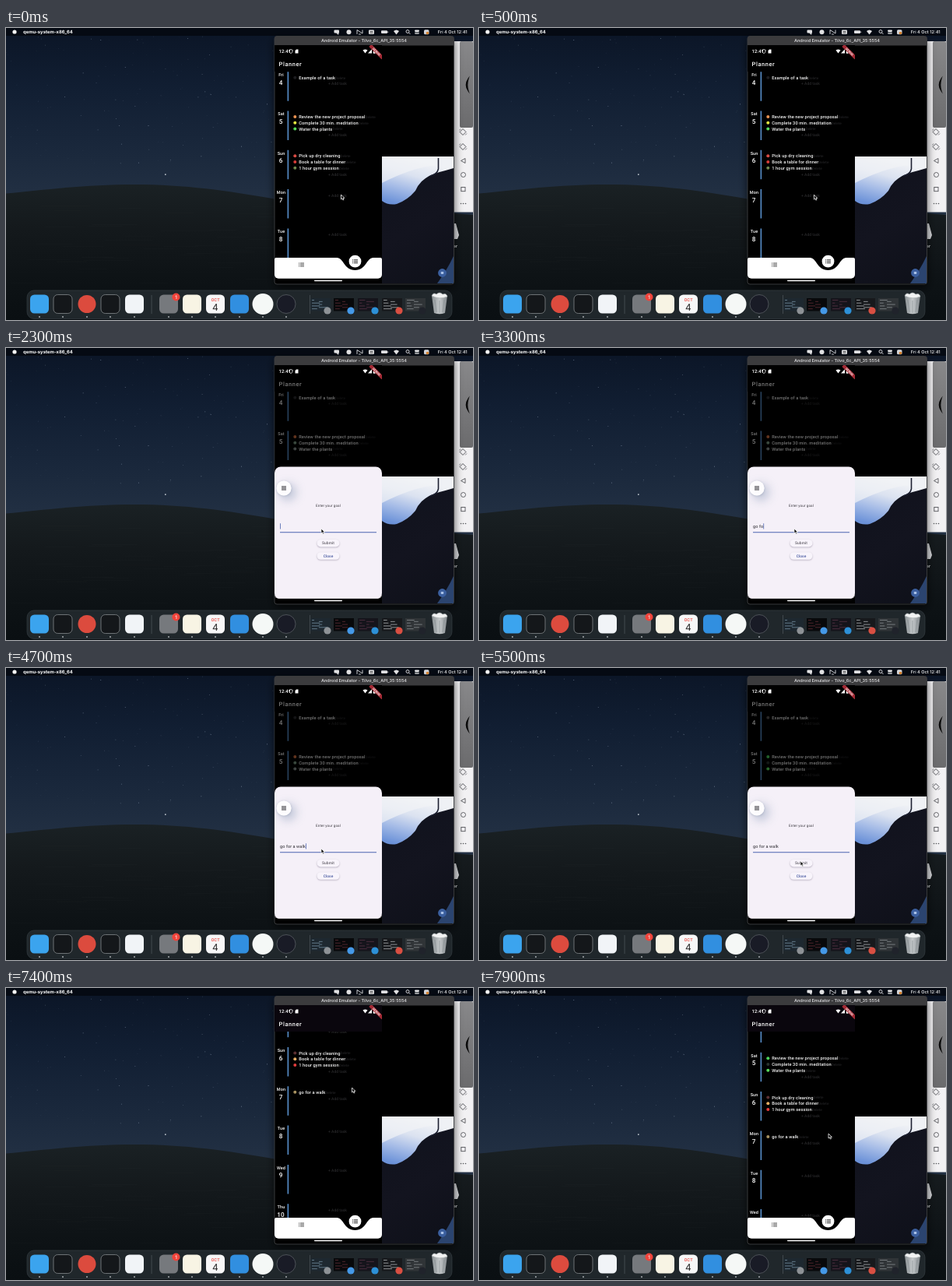
An HTML page with a canvas for the animation above (8000 ms loop, 600 by 375 pixels).

```html
<!DOCTYPE html>
<html lang="en">
<head>
<meta charset="utf-8">
<title>Planner demo</title>
<style>
html, body { margin: 0; width: 100%; height: 100%; overflow: hidden; background: #0b1220; }
canvas { display: block; }
</style>
</head>
<body>
<canvas id="stage" width="600" height="375"></canvas>
<script>
const g = document.getElementById('stage').getContext('2d');
const LOOP = 8000;
const UI = 'Inter, sans-serif', APP = 'Roboto, sans-serif';

// ---- helpers ----
function text(s, x, y, size, color, { weight = 500, align = 'left', font = APP, gap = 0 } = {}) {
  g.font = `${weight} ${size}px ${font}`;
  g.letterSpacing = gap + 'px';
  g.textRendering = 'geometricPrecision';
  g.textAlign = align;
  g.textBaseline = 'alphabetic';
  g.fillStyle = color;
  g.fillText(s, x, y);
  return g.measureText(s).width;
}
function rect(x, y, w, h, color, r = 0) {
  g.fillStyle = color;
  g.beginPath();
  g.roundRect(x, y, w, h, r);
  g.fill();
}
function outline(color, width) {
  g.strokeStyle = color;
  g.lineWidth = width;
  g.stroke();
}
function disc(x, y, r, color) {
  g.fillStyle = color;
  g.beginPath();
  g.arc(x, y, r, 0, 7);
  g.fill();
}
function path(d, fill, stroke, width = 1) {
  const p = new Path2D(d);
  if (fill) { g.fillStyle = fill; g.fill(p); }
  if (stroke) { g.strokeStyle = stroke; g.lineWidth = width; g.stroke(p); }
}
function gradient(x0, y0, x1, y1, ...colors) {
  const f = g.createLinearGradient(x0, y0, x1, y1);
  colors.forEach((c, i) => f.addColorStop(i / (colors.length - 1), c));
  return f;
}
function clipped(x, y, w, h, draw, r = 0) {
  g.save();
  g.beginPath();
  g.roundRect(x, y, w, h, r);
  g.clip();
  draw();
  g.restore();
}
function shadow(blur, dx, dy, color, draw) {
  g.save();
  Object.assign(g, { shadowBlur: blur, shadowOffsetX: dx, shadowOffsetY: dy, shadowColor: color });
  draw();
  g.restore();
}
function random(seed) {
  return () => (seed = seed * 16807 % 2147483647) / 2147483647;
}
const clamp = v => Math.max(0, Math.min(1, v));
const smooth = v => v * v * (3 - 2 * v);
const ramp = (t, a, b) => smooth(clamp((t - a) / (b - a)));

// keys: [time, value...] rows, eased between neighbours
function track(keys, t) {
  let i = 0;
  while (i < keys.length - 2 && t >= keys[i + 1][0]) i++;
  const [a, ...from] = keys[i], [b, ...to] = keys[i + 1];
  const k = ramp(t, a, b);
  return from.map((v, n) => v + (to[n] - v) * k);
}

// ---- desktop ----
function desktop() {
  rect(0, 0, 600, 375, gradient(0, 0, 0, 225, '#0b1526', '#111e32', '#19273b', '#233144'));
  const rnd = random(77);
  for (let i = 0; i < 150; i++) {
    const x = rnd() * 345, y = 10 + rnd() * 165, a = 0.08 + rnd() ** 4 * 0.6;
    rect(x, y, 0.8, 0.8, `rgba(200,215,235,${a})`);
  }
  rect(204, 187.5, 1.6, 1.2, '#e6ecf2');
  path('M0 212.500C50 208 100 201 165 201C230 201 285 209 345 219.500L600 240V375H0Z',
    gradient(0, 200, 0, 375, '#1a2124', '#14191c', '#0e1316', '#0a0f12'));
  for (let i = 0; i < 40; i++) {
    const x = rnd() * 330, y = 228 + rnd() * 105;
    rect(x, y, 25 + rnd() * 40, 0.6, 'rgba(60,72,72,.10)');
  }
}

function menuBar() {
  rect(0, 0, 600, 10, '#050a13');
  disc(11, 5, 2.6, '#f4f4f4');
  text('qemu-system-x86_64', 22, 7, 5.9, '#fff', { weight: 700, font: UI });
  const w = '#e8e8ea';
  rect(421.5, 2.5, 6.5, 4, w, 1);
  path('M424 6L427 9L428 5Z', w);
  disc(440.5, 5.3, 3, w);
  path('M451 8V2.5L458 7V2.5M453 8H456', null, w, 0.9);
  rect(466, 2.5, 7, 5.5, w, 1);
  rect(467.5, 4, 4, 0.8, '#333');
  rect(467.5, 5.8, 4, 0.8, '#333');
  rect(482, 3.3, 8, 3.8, w, 1);
  rect(490.4, 4.4, 0.8, 1.6, w);
  path('M498 4Q501.500 1 505 4L501.500 8.500Z', w);
  path('M517.500 6L519.500 8M518 4.500A2 2 0 1 1 514 4.500A2 2 0 1 1 518 4.500', null, w, 0.9);
  rect(525, 2.6, 6, 2.3, w, 1.2);
  rect(525, 5.6, 6, 2.3, '#a2a4a8', 1.2);
  rect(537, 2.3, 6.5, 6, '#dcdcdf', 1.5);
  disc(541.5, 6.5, 1.8, '#e58b32');
  text('Fri 4 Oct 12:41', 592.5, 7, 5.6, '#fff', { align: 'right', font: UI });
}

function dock() {
  rect(27, 337, 546, 36.5, '#20272b', 9);
  outline('#3b4348', 0.6);
  const tile = (x, color) => rect(x - 12, 342.500, 24, 24, color, 5.5);
  tile(43, '#3ba4ee');
  for (const x of [73, 134]) {
    tile(x, '#14171a');
    outline('#83888b', 0.8);
  }
  disc(104, 354.500, 11.5, '#dc4b3e');
  tile(165, '#f1f4f7');
  tile(209, '#76797d');
  tile(239, '#f8f4e4');
  tile(269, '#f7f7f7');
  text('OCT', 269, 350.500, 5.2, '#ed4a42', { weight: 600, align: 'center', font: UI });
  text('4', 269, 363, 12, '#222', { weight: 400, align: 'center', font: UI });
  tile(300, '#318fe0');
  disc(330, 354.500, 13.5, '#f5f8f6');
  disc(360, 354.500, 12, '#191b26');
  outline('#6d7277', 0.6);
  disc(218.500, 345.500, 5, '#f0443b');
  text('1', 218.500, 347.800, 6.2, '#fff', { align: 'center', font: UI });
  for (const x of [43, 73, 104, 134, 165, 209, 239, 269, 300, 330, 360]) disc(x, 371, 0.9, '#b8bcbf');
  rect(186.700, 343, 0.7, 24, '#51595d');
  rect(390, 343, 0.7, 24, '#51595d');

  const thumbs = [[404, '#1e2830', '#7d99ad', '#8e9296'], [434, '#08090b', '#6a3038', '#4599e7'],
    [465, '#15141b', '#5f364a', '#2d91d8'], [496, '#17191c', '#c0c4c7', '#d94f42'],
    [526, '#303437', '#92979a', '#20232b']];
  const rnd = random(9);
  for (const [x, back, ink, badge] of thumbs) {
    rect(x - 13, 347, 26, 16.500, back);
    for (let i = 0; i < 7; i++) rect(x - 11 + (i % 2) * 9, 349 + i * 1.900, 3 + rnd() * 9, 0.7, ink);
    disc(x + 9, 363, 4.6, badge);
  }

  // bin
  path('M547 344H567L564 366Q557 368.500 550 366Z', gradient(547, 0, 567, 0, '#8b9194', '#c5c9cb', '#82888c'));
  path('M547 344Q549 339 553 342Q557 338 561 342Q566 340 567 345Q557 349 547 344Z', '#f2f3f3', '#aab0b2', 0.6);
  path('M551 349L553 365M557 350V366M563 349L561 365', null, '#80888c', 0.6);
}

// ---- emulator ----
function sideTools() {
  rect(575, 17, 25, 219.500, '#f2f1f3');
  rect(583, 17, 17, 111, gradient(0, 17, 0, 128, '#88888a', '#6b6b6d'), 2);
  path('M594 65Q588.500 73 594 81Q591.500 73 594 65Z', '#080808', '#080808', 1.2);
  const ink = '#55565b';
  for (const y of [133.500, 152.500]) {
    path(`M587 ${y - 4}L591 ${y}L587 ${y + 4}L583 ${y}Z`, null, ink, 1);
    path(`M584 ${y - 4}L582.500 ${y - 2}M590 ${y + 4}L592 ${y + 2}`, null, ink, 0.8);
  }
  path('M590 167.500V173.500L584.500 170.500Z', null, ink, 0.9);
  g.beginPath();
  g.arc(587.500, 188.500, 3, 0, 7);
  g.stroke();
  g.strokeRect(584.800, 204.500, 5.2, 5.2);
  for (const x of [584.500, 587.500, 590.500]) disc(x, 225.500, 0.8, ink);
  path('M566 251H578L582 266L580 271H566Z', '#d8d9dc');
  text('er', 580, 282, 5.4, '#fff', { align: 'right', font: UI });
}

function wallpaper() {
  clipped(483, 165, 92, 163, () => {
    rect(483, 165, 92, 163, gradient(483, 180, 575, 328, '#10121d', '#13141f', '#0e1019'));
    path('M483 165H575V180Q565 183 557 185Q544 188 534 197Q529 202 526 209Q516 221 502 226Q491 228 483 222Z',
      gradient(520, 168, 504, 226, '#eff1f5', '#dbe2f0', '#a3bae6', '#6c92d8'));
    path('M483 165H552V176Q520 180 483 199Z', 'rgba(243,244,247,.7)');
    path('M555.500 167V181Q554 188 545 190', null, '#1c2030', 1.6);
    path('M575 293Q567 310 554 328H575Z', '#2b446f');
  });
  disc(560.500, 314.500, 5.4, '#3b5f9f');
  rect(558.800, 313, 3.4, 3, '#a9c0e6', 0.4);
}

const days = [
  ['Fri', ['Example of a task']],
  ['Sat', ['Review the new project proposal', 'Complete 30 min. meditation', 'Water the plants']],
  ['Sun', ['Pick up dry cleaning', 'Book a table for dinner', '1 hour gym session']],
  ['Mon', []], ['Tue', []], ['Wed', []], ['Thu', []], ['Fri', []],
];
// dot colours, redrawn whenever the list is rebuilt
const dots = [
  [0, '#1d1d20 #ee9351 #e4e83f #55d95a #d94b43 #d83d39 #71894f #a58b62'],
  [700, '#2b2b2d #e0625c #73b479 #829388 #d94b43 #d83d39 #71894f #a58b62'],
  [1900, '#2b2b2d #d6713f #7c9c85 #88918f #d94b43 #d83d39 #71894f #a58b62'],
  [5500, '#55504e #4bd35a #29322e #58dc5c #5b3032 #e5ae64 #e33d3d #a89260'],
];

function listIcon(x, y, color) {
  for (const dy of [-2, 0, 2]) {
    rect(x - 3.500, y + dy - 0.5, 1, 1, color);
    rect(x - 1.700, y + dy - 0.5, 5.200, 1, color);
  }
}

function planner(t, scroll) {
  const colors = dots.filter(d => t >= d[0]).pop()[1].split(' ');
  let n = 0;
  clipped(345, 56, 138, 264, () => days.forEach(([name, list], i) => {
    const top = 56.200 + i * 50.300 - scroll;
    const tasks = name === 'Mon' && t >= 5500 ? ['go for a walk'] : list;
    text(name, 353.500, top + 5.800, 5.5, '#fff', { align: 'center', gap: 0.1 });
    text(i + 4, 353, top + 16.500, 8.2, '#fff', { align: 'center' });
    rect(361.600, top, 1.500, 37.500, '#5b94d2');
    tasks.forEach((s, k) => {
      const y = top + 7.500 + k * 7.750;
      disc(371.300, y, 2, colors[n++]);
      const w = text(s, 376.200, y + 2, 5.7, '#f5f5f5', { gap: 0.1 });
      text('Delete', 376.200 + w, y + 1.800, 4.6, '#1f1f21');
    });
    text('+ Add task', 426, top + 9.500 + tasks.length * 7.750, 5, '#29292b', { align: 'center' });
  }));

  rect(345, 22, 138, 34, scroll > 0.5 ? '#0a060d' : '#000');
  text('Planner', 350.600, 49.200, 7.5, '#fff', { gap: 0.55 });

  path('M345 297Q345 295 347 295H425C434 295 434 311 448.500 311C463 311 463 295 472 295H481Q483 295 483 297V322H345Z', '#fff');
  listIcon(379.500, 304, '#555');
  disc(448.500, 299.700, 7.9, '#fff');
  listIcon(448.500, 299.700, '#333');
}

function pill(label, y, color) {
  shadow(2, 0, 0.8, 'rgba(60,50,80,.35)', () => rect(399.500, y - 4.800, 29, 9.600, '#f8f4fb', 4.8));
  text(label, 414, y + 1.700, 4.9, color, { align: 'center', gap: 0.04 });
}

function goalSheet(t, open) {
  g.save();
  g.translate(0, (1 - open) * 170);
  rect(345, 152.500, 138, 170, '#f5f0f8', 8);
  const x = 357 + 2 * (1 - ramp(t, 1300, 1700));
  shadow(14, 5, 5, 'rgba(125,145,175,.6)', () => disc(x, 180, 9.600, '#fff'));
  shadow(3, 0, 0.5, 'rgba(90,100,130,.35)', () => disc(x, 180, 9.600, '#fdfcfe'));
  for (const dy of [-2, 0, 2]) rect(x - 3, 179.600 + dy, 6, 0.9, '#2d2d32');
  text('Enter your goal', 414, 203.800, 4.6, '#3c3a40', { weight: 400, align: 'center', gap: 0.08 });

  const focus = t >= 2100;
  rect(352, focus ? 236.200 : 236.600, 124, focus ? 1.100 : 0.6, focus ? '#4c64b0' : '#77737b');
  const typed = 'go for a walk'.slice(0, Math.max(0, Math.floor((t - 2490) / 160)));
  const width = text(typed, 352, 231, 5.5, '#27252b', { weight: 400, gap: 0.1 });
  const blinkOn = t < 4750 || (t - 4600) % 1000 < 500;
  if (focus && blinkOn) rect(352.200 + width, 225.300, 0.8, 7.200, '#4c64b0');
  pill('Submit', 250.700, '#65616a');
  pill('Close', 267, '#4658a0');
  g.restore();
}

function statusBar() {
  text('12:41', 350.500, 32, 6, '#fff', { gap: 0.1 });
  path('M366 27.500L368.300 28.500Q368.300 31.500 366 32.800Q363.700 31.500 363.700 28.500Z', null, '#fff', 0.8);
  path('M371.500 32.500V29L373 27.500H375.500V32.500Z', '#fff');
  path('M458.500 28.500Q461.500 26.500 464.500 28.500L461.500 32.500Z', '#fff');
  path('M470 27.300V32.500H465Z', '#fff');
  rect(471.800, 27.500, 3, 5.300, '#fff', 0.6);
  clipped(345, 22, 138, 40, () => {
    g.translate(476, 30.500);
    g.rotate(Math.PI / 4);
    rect(-11.500, -2.200, 23, 4.400, '#a52a35');
    text('DEBUG', 0, 1.400, 4, '#f4dada', { weight: 800, align: 'center' });
  });
}

const pointerKeys = [[0, 430.500, 214], [1450, 430.200, 214.500], [2000, 405, 232], [4900, 405, 232],
  [5300, 413, 248], [5600, 413, 248], [6200, 447, 229], [6350, 447, 229], [6650, 446, 211],
  [7250, 444.500, 128], [7400, 444.500, 128], [7900, 449, 187], [8000, 449, 190]];
const scrollKeys = [[0, 0], [6650, 0], [7250, 80.800], [7400, 80.800], [7900, 23.700], [8000, 20.700]];

function pointer(t) {
  const [x, y] = track(pointerKeys, t);
  g.save();
  g.translate(x, y);
  path('M0 0V6L1.400 4.800L2.400 7L3.500 6.500L2.500 4.400H4.400Z', '#050505', '#f4f4f4', 0.8);
  g.restore();
}

function emulator(t) {
  shadow(12, 0, 4, 'rgba(0,0,0,.7)', () => rect(345, 10.500, 230.500, 318.500, '#000', 3));
  outline('#46474a', 0.8);
  rect(345, 10.500, 230.500, 12, '#3b3b3d', [3, 3, 0, 0]);
  text('Android Emulator - Tilvo_6c_API_35:5554', 460, 18.100, 5.5, '#d4d4d6',
    { weight: 600, align: 'center', font: UI });
  wallpaper();
  const open = ramp(t, 700, 950) * (1 - ramp(t, 5500, 5720));
  clipped(345, 22, 138, 299.800, () => {
    planner(t, track(scrollKeys, t)[0]);
    if (open > 0) {
      rect(345, 22, 138, 300, `rgba(0,0,0,${0.54 * open})`);
      goalSheet(t, open);
    }
  }, [0, 0, 5, 5]);
  statusBar();
  rect(396, 323.800, 36, 1.400, '#fff', 0.7);
}

function frame() {
  const t = performance.now() % LOOP;
  desktop();
  menuBar();
  sideTools();
  emulator(t);
  dock();
  pointer(t);
  requestAnimationFrame(frame);
}
frame();
</script>
</body>
</html>
```
